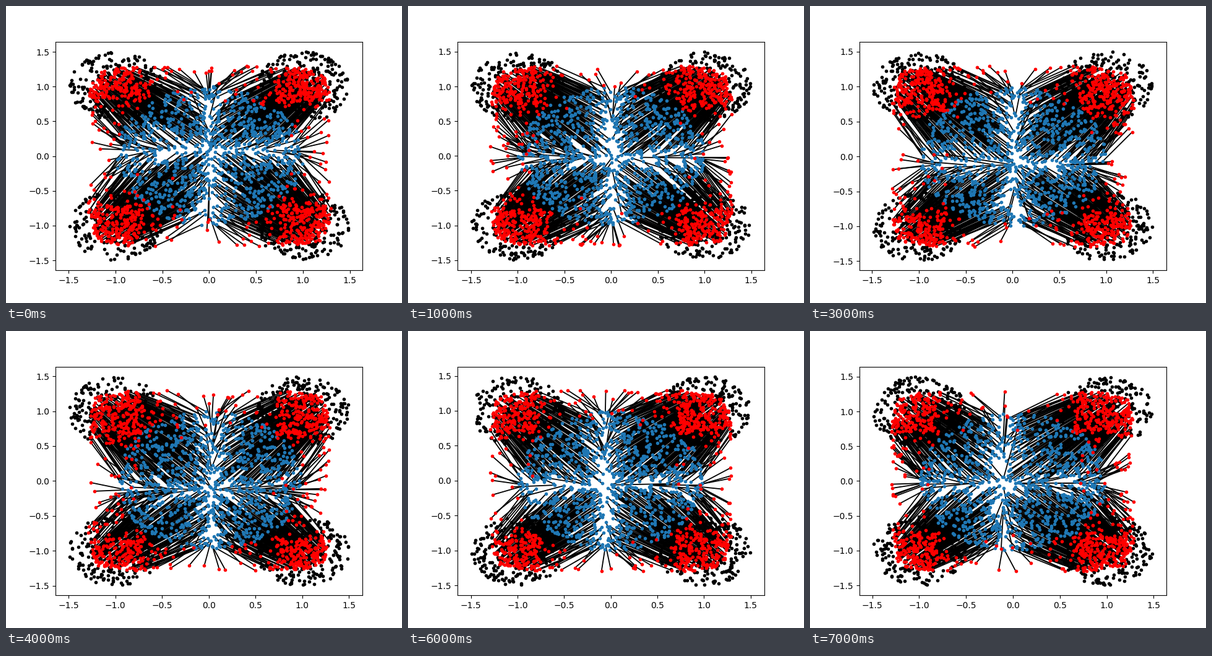
These frames come from a looping animation (640 px wide and 480 px high, 8 s). A matplotlib script:

```python
import numpy as np
import matplotlib.pyplot as plt
from matplotlib.animation import FuncAnimation
from matplotlib.collections import LineCollection

FRAMES = 8
COUNT = 1000

# Drift of the point where the learned map splits the disc into four parts
KEYS = [0, 2, 4, 7]
SPLIT_X = [0.0, 0.02, 0.03, -0.1]
SPLIT_Y = [0.08, -0.12, -0.12, -0.03]


def disc(rng, radius):
    """Uniform points in a disc around the origin."""
    r = radius * np.sqrt(rng.random(COUNT))
    a = 2 * np.pi * rng.random(COUNT)
    return np.column_stack([r * np.cos(a), r * np.sin(a)])


def corner_discs(rng):
    """Uniform points in four discs around (+-1, +-1)."""
    return disc(rng, 0.5) + rng.choice([-1, 1], size=(COUNT, 2))


def transport(points, split):
    """Push points away from the split and swell the disc towards a square."""
    offset = points - split
    softness = 0.01 + 0.07 * np.linalg.norm(offset, axis=1, keepdims=True)
    norm = np.linalg.norm(points, axis=1, keepdims=True)
    swell = 0.5 + 0.5 * norm / np.abs(points).max(axis=1, keepdims=True)
    return 0.7 * np.tanh(offset / softness) + 0.6 * swell * points


fig, ax = plt.subplots(figsize=(6.4, 4.8), dpi=100)
paths = LineCollection([], colors="black", linewidths=1.3, zorder=1)
ax.add_collection(paths, autolim=False)
target, = ax.plot([], [], "k.")
start, = ax.plot([], [], ".", color="tab:blue")
moved, = ax.plot([], [], "r.")


def update(step):
    rng = np.random.default_rng(40 + step)
    split = np.array([np.interp(step, KEYS, SPLIT_X),
                      np.interp(step, KEYS, SPLIT_Y)])
    src = disc(rng, 1)
    dst = transport(src, split)
    paths.set_segments(np.stack([src, dst], axis=1))
    target.set_data(*corner_discs(rng).T)
    start.set_data(*src.T)
    moved.set_data(*dst.T)
    ax.relim()
    ax.autoscale_view()
    return paths, target, start, moved


anim = FuncAnimation(fig, update, frames=FRAMES, interval=1000, repeat=True)
plt.show()
```
